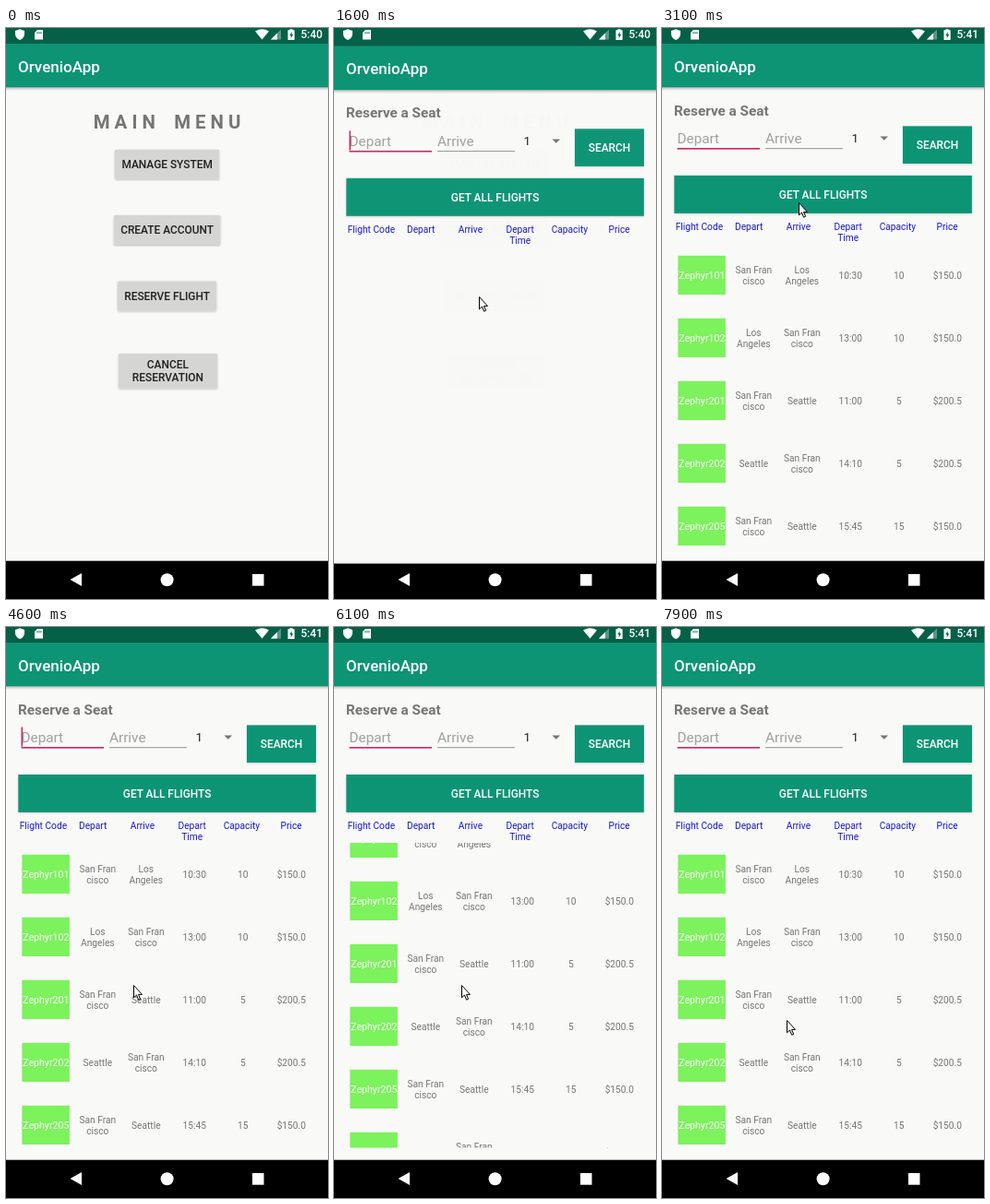
An HTML page that plays this animation: 349 by 619 pixels, repeating every 8 s.

```html
<!DOCTYPE html>
<html lang="en">
<head>
<meta charset="utf-8">
<title>Flight booking</title>
<style>
  html, body { margin: 0; width: 100%; height: 100%; overflow: hidden; background: #000; }
  svg { display: block; width: 100vw; height: 100vh; }
  text { font: 10.2px Roboto, sans-serif; fill: #757575; white-space: pre; }
  .mid { text-anchor: middle; }
  .btn { font-size: 11.9px; font-weight: 500; fill: #1f201f; }
  .light { fill: #fff; }
  .code { font-size: 10.6px; }
  .head { fill: #1818c0; }
  .hint { font-size: 15.3px; fill: #a0a09f; }
  .count { font-size: 13.6px; fill: #222; }
  .caption { font-size: 15.3px; font-weight: 700; }
  .menu { font-size: 20.4px; font-weight: 700; }
  .title { font-size: 17px; font-weight: 500; fill: #fff; }
  .clock { font-size: 11.9px; font-weight: 500; fill: #fff; text-anchor: end; }
</style>
</head>
<body>
<svg id="stage" viewBox="0 0 349 619" preserveAspectRatio="none"></svg>
<script>
const LOOP = 8000, STEP = 100;
const GREEN = '#0c9474', PAPER = '#f9f9f8', PINK = '#cf2465', CENTER = 174.6;

const rect = (x, y, w, h, fill, extra = '') =>
  `<rect x="${x}" y="${y}" width="${w}" height="${h}" fill="${fill}" ${extra}/>`;
const text = (x, y, str, cls = '', extra = '') =>
  `<text x="${x}" y="${y}" class="${cls}" ${extra}>${str}</text>`;

// Lines separated by "|" are centred on (x, y).
const lines = (x, y, str, cls = '', gap = 12, drop = 3.6) => {
  const parts = String(str).split('|');
  return parts.map((part, i) =>
    text(x, y + drop + (i - (parts.length - 1) / 2) * gap, part, 'mid ' + cls)).join('');
};

const button = (cx, cy, w, h, label) =>
  rect(cx - w / 2, cy - h / 2, w, h, '#d5d6d4', 'rx="1.5" filter="url(#shadow)"') +
  lines(cx, cy, label, 'btn', 14, 4.2);
const greenButton = (cx, cy, w, h, label) =>
  rect(cx - w / 2, cy - h / 2, w, h, GREEN, 'filter="url(#softShadow)"') +
  lines(cx, cy, label, 'btn light', 14, 4.2);

const frame = content =>
  rect(0, -20, 349, 37, '#066048') + rect(0, 17, 349, 561, PAPER) +
  rect(0, 64, 349, 4, 'url(#barShade)') + rect(0, 17, 349, 47.3, GREEN) +
  text(13, 47.5, 'OrvenioApp', 'title') + rect(0, 577.7, 349, 60, '#000') + content;

const menuScreen = frame(
  text(CENTER, 109.3, 'M A I N    M E N U', 'mid menu') +
  button(CENTER, 147.8, 113, 32, 'MANAGE SYSTEM') +
  button(CENTER, 219, 115.5, 32, 'CREATE ACCOUNT') +
  button(CENTER, 290.5, 107, 32, 'RESERVE FLIGHT') +
  '<g clip-path="url(#reserveClip)"><circle id="ripple" cx="157" cy="291" opacity=".12"/></g>' +
  button(175.4, 371.7, 107, 37.5, 'CANCEL|RESERVATION'));

const SF = 'San Fran|cisco', LA = 'Los|Angeles';
const flights = [
  [101, SF, LA, '10:30', 10, '$150.0'],
  [102, LA, SF, '13:00', 10, '$150.0'],
  [201, SF, 'Seattle', '11:00', 5, '$200.5'],
  [202, 'Seattle', SF, '14:10', 5, '$200.5'],
  [205, SF, 'Seattle', '15:45', 15, '$150.0'],
  [300, 'Boston', SF, '13:50', 30, '$500.0']
];
const flightRow = ([code, ...cells], i) => {
  const y = 268 + 68 * i;
  return rect(17.3, y - 21.2, 51.6, 42.2, '#7cf25c') +
    lines(43.3, y, 'Zephyr' + code, 'light code') +
    cells.map((cell, c) => lines(99.3 + 52.5 * c, y, cell)).join('');
};

const headers = ['Flight Code', 'Depart', 'Arrive', 'Depart', 'Capacity', 'Price'];

const seatScreen = frame(
  text(13, 94.5, 'Reserve a Seat', 'caption') +
  text(16.5, 124.8, 'Depart', 'hint') + text(112, 124.8, 'Arrive', 'hint') +
  rect(16.5, 130, 89.5, 1.6, PINK) + rect(112, 130.2, 84, 1, '#929292') +
  rect(16.5, 108.5, 1.6, 21, PINK, 'id="caret"') +
  text(205.5, 124, '1', 'count') +
  '<path d="M236.5 117.5h8.6l-4.3 4.3z" fill="#747474"/>' +
  greenButton(298.5, 126.7, 75, 40.6, 'SEARCH') +
  greenButton(CENTER, 180.4, 322.6, 41, 'GET ALL FLIGHTS') +
  headers.map((label, i) => lines(40.4 + 53.75 * i, 215.2, label, 'head')).join('') +
  lines(201.7, 227.2, 'Time', 'head') +
  `<g id="list" clip-path="url(#listClip)"><g id="rows">${flights.map(flightRow).join('')}</g>
   <ellipse id="glowTop" cx="${CENTER}" cy="234" rx="161" ry="14" fill="${GREEN}"/>
   <ellipse id="glowBottom" cx="${CENTER}" cy="564.5" rx="161" ry="14" fill="${GREEN}"/></g>`);

const systemIcons = `<g fill="#fff" fill-rule="evenodd">
  <path d="M15 1.200l5 1.900v3.600q-.4 4.600-5 6.200q-4.600-1.600-5-6.200v-3.600z"/>
  <path d="M34 2h6v10.400h-9v-7.400zM33.500 4.300v2h1v-2zM35.500 4.300v2h1v-2zM37.500 4.300v2h1v-2z"/>
  <path d="M270 3.500q7.500-4.600 15 0l-7.500 9z"/>
  <path d="M298 1.500v11h-11z" opacity=".35"/><path d="M294 5.500v7h-7z"/>
  <path d="M305.500 2.300h2v-1h3.200v1h2v10.700h-7.200zM309.700 4.200l-2.400 4h1.500v3l2.400-4.200h-1.500z"/>
  <path d="M69.500 598l12.500-7v14z"/><circle cx="${CENTER}" cy="598.2" r="7"/>
  <path d="M267 592h12.500v12.700h-12.500z"/></g>` + text(343, 11.3, '', 'clock', 'id="clock"');

const shadow = (id, opacity) => `<filter id="${id}" x="-10%" y="-20%" width="120%" height="150%">
  <feDropShadow dx="0" dy=".8" stdDeviation=".8" flood-opacity="${opacity}"/></filter>`;

document.getElementById('stage').innerHTML = `<defs>
  ${shadow('shadow', 0.28)}${shadow('softShadow', 0.18)}
  <linearGradient id="barShade" x2="0" y2="1">
    <stop stop-opacity=".25"/><stop offset="1" stop-opacity="0"/></linearGradient>
  <clipPath id="reserveClip">${rect(121, 274.5, 107, 32, '#000')}</clipPath>
  <clipPath id="listClip">${rect(13, 234, 323, 330.5, '#000')}</clipPath></defs>
  ${menuScreen}<g id="seat">${seatScreen}</g>${systemIcons}
  <path id="pointer" d="M.5.5v13.300l3-2.800l2.100 5.200l2-.9l-2.100-4.900h4z"
    fill="#fff" stroke="#000" stroke-linejoin="round"/>`;

const ramp = (t, start, end) => Math.min(1, Math.max(0, (t - start) / (end - start)));
const smooth = (t, start, end) => {
  const p = ramp(t, start, end);
  return p * p * (3 - 2 * p);
};
const pulse = (t, start, end) => Math.sin(Math.PI * ramp(t, start, end));

// Each glide: start, end, and the point it reaches.
const glides = [
  [400, 500, 76, 279], [600, 900, 157, 291], [1800, 2000, 148, 189],
  [3100, 3200, 137, 301], [4200, 4600, 138, 388], [6200, 6600, 135, 426]
];
const pointerAt = t => glides.reduce(([x, y], [start, end, toX, toY]) => {
  const p = smooth(t, start, end);
  return [x + (toX - x) * p, y + (toY - y) * p];
}, [16, 343]);

const byId = id => document.getElementById(id);
const set = (id, name, value) => byId(id).setAttribute(name, value);
const show = (id, visible) => set(id, 'display', visible ? 'inline' : 'none');

function draw(t) {
  show('pointer', t >= 400);
  set('pointer', 'transform', `translate(${pointerAt(t)})`);
  set('ripple', 'r', t < 1100 ? 0 : 20 + (t - 1100) / 4);

  const remaining = 1 - ramp(t, 1400, 1700);
  show('seat', remaining < 1);
  set('seat', 'transform', `translate(0 ${51 * remaining ** 2.6})`);
  set('seat', 'opacity', 1 - remaining ** 4);
  show('caret', Math.floor((t + 100) / 500) % 2);

  const loaded = t >= 2400;
  byId('clock').textContent = loaded ? '5:41' : '5:40';
  show('list', loaded);
  set('rows', 'transform', `translate(0 ${78 * (smooth(t, 5900, 6300) - smooth(t, 4700, 5100))})`);
  set('glowBottom', 'opacity', 0.06 * pulse(t, 5000, 5600));
  set('glowTop', 'opacity', 0.06 * pulse(t, 6300, 6700));
}

function tick() {
  draw(Math.floor(performance.now() % LOOP / STEP) * STEP);
  requestAnimationFrame(tick);
}
tick();
</script>
</body>
</html>
```
